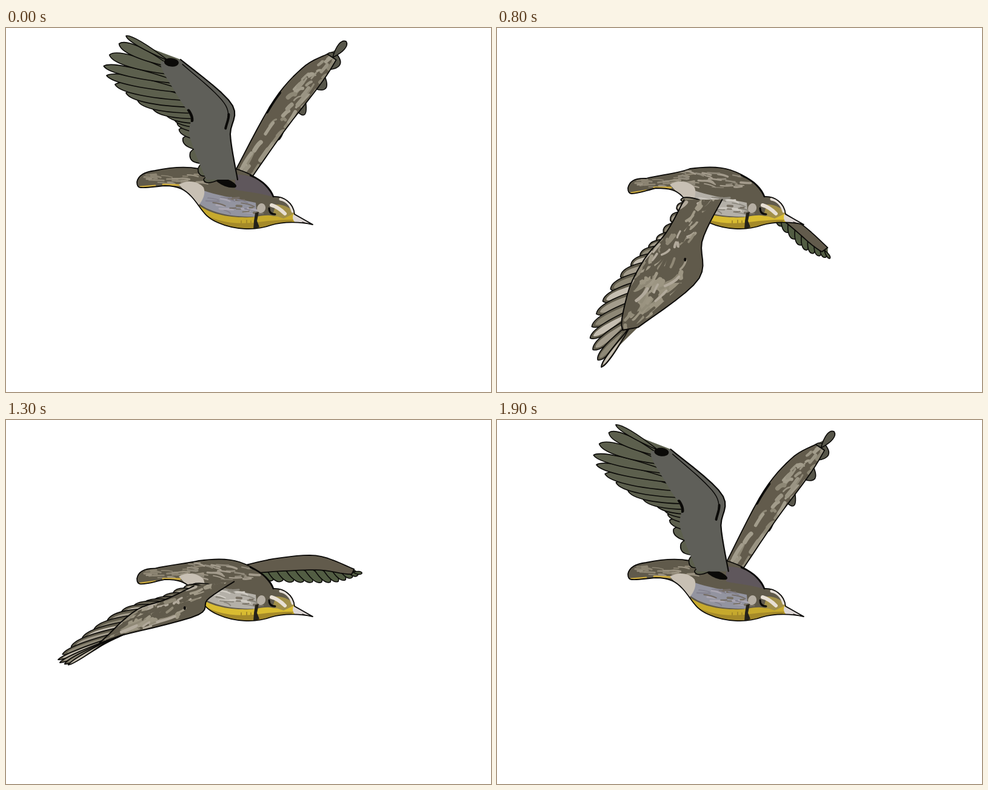
Animation, 800 px wide and 600 px high, one loop 2000 ms. Source, as an HTML page with a canvas:

```html
<!DOCTYPE html>
<html lang="en">
<head>
<meta charset="utf-8">
<title>Bird in flight</title>
<style>
  html, body { margin: 0; width: 100%; height: 100%; overflow: hidden; background: #fff; }
  canvas { display: block; width: 800px; height: 600px; }
</style>
</head>
<body>
<canvas id="stage" width="800" height="600"></canvas>
<script>
const ctx = document.getElementById('stage').getContext('2d');
const INK = '#0b0a08', BROWN = '#605a4b', STEP = 100, STEPS = 20;
const NEAR_ROOT = [350, 245], FAR_ROOT = [395, 238];

const lerp = (a, b, u) => a + (b - a) * u;
const between = (p, q, u) => [lerp(p[0], q[0], u), lerp(p[1], q[1], u)];
const distance = (p, q) => Math.hypot(p[0] - q[0], p[1] - q[1]);
const series = (n, f) => Array.from({ length: n }, (_, i) => f(i / (n - 1)));

function randomizer(seed) {
  return () => {
    seed = (seed * 16807) % 2147483647;
    return seed / 2147483647;
  };
}

// A wing is two curves from shoulder to hand: its leading edge and its feather tips.
const wing = (lead, tips) => ({ lead, tips });
const pose = (at, droop, near, far) => ({ at, droop, near, far });

const raised = pose(0, 0,
  wing([[382, 250], [370, 178], [372, 125], [288, 52]],
       [[326, 250], [290, 178], [272, 145], [205, 112], [161, 66], [198, 13]]),
  wing([[380, 232], [440, 122], [490, 65], [530, 43]],
       [[404, 246], [460, 165], [526, 80], [561, 22]]));
const spread = pose(3, 4,
  wing([[383, 250], [355, 203], [340, 168], [235, 145]],
       [[328, 255], [280, 220], [240, 194], [175, 190], [122, 176], [150, 139]]),
  wing([[385, 233], [440, 175], [500, 125], [566, 106]],
       [[408, 245], [490, 188], [562, 130], [597, 98]]));
const lowered = pose(6, 9,
  wing([[372, 272], [330, 335], [315, 390], [205, 447]],
       [[302, 280], [262, 330], [215, 365], [160, 425], [129, 485], [137, 517]]),
  wing([[405, 241], [450, 255], [520, 273], [576, 312]],
       [[440, 268], [490, 300], [540, 328], [580, 325]]));
const deepest = pose(10, 11,
  wing([[370, 292], [348, 360], [348, 435], [265, 530]],
       [[306, 285], [285, 345], [250, 392], [205, 452], [186, 520], [214, 589]]),
  wing([[440, 270], [460, 328], [490, 378], [510, 408]],
       [[425, 305], [450, 350], [478, 400], [513, 430]]));

// Shifts a wing in proportion to the distance from its root.
function reach({ lead, tips }, root, dx, dy) {
  const move = p => {
    const d = distance(p, root) / 270;
    return [p[0] + dx * d, p[1] + dy * d];
  };
  return wing(lead.map(move), tips.map(move));
}
const variant = (p, at, near, far) => pose(at, p.droop,
  reach(p.near, NEAR_ROOT, ...near), reach(p.far, FAR_ROOT, ...far));

const POSES = [raised, spread, lowered, deepest,
  variant(lowered, 12, [-11, 0], [-17, 4]),
  variant(spread, 15, [-22, -8], [-18, 0]),
  variant(raised, 19, [-2, -5], [-5, -3]),
  { ...raised, at: STEPS }];

function blendWing(a, b, u, root, swell) {
  const grow = 1 + swell * Math.sin(Math.PI * u);
  const mix = part => a[part].map((p, i) => between(root, between(p, b[part][i], u), grow));
  return wing(mix('lead'), mix('tips'));
}

function poseAt(step) {
  const k = POSES.findIndex(p => step < p.at) - 1;
  const a = POSES[k], b = POSES[k + 1], u = (step - a.at) / (b.at - a.at);
  const swell = Math.abs(b.droop - a.droop) > 4 ? 0.12 : 0.02;
  return {
    droop: lerp(a.droop, b.droop, u),
    near: blendWing(a.near, b.near, u, NEAR_ROOT, swell),
    far: blendWing(a.far, b.far, u, FAR_ROOT, swell * 0.85)
  };
}

// Catmull-Rom point on a list of key points.
function curve(points, u) {
  const last = points.length - 1, s = Math.min(1, Math.max(0, u)) * last;
  const k = Math.min(last - 1, Math.floor(s)), f = s - k;
  const [p, q, r, t] = [-1, 0, 1, 2].map(o => points[Math.min(last, Math.max(0, k + o))]);
  return q.map((b, i) => {
    const a = p[i], c = r[i], d = t[i];
    return b + 0.5 * f * (c - a + f * (2 * a - 5 * b + 4 * c - d + f * (3 * (b - c) + d - a)));
  });
}

// Maps along/across onto the panel; cover(u) is how far it overlaps the feathers.
const surface = (w, cover) => (u, v) =>
  between(curve(w.lead, u), curve(w.tips, u * 0.8), v * cover(u));

function polygon(points) {
  const path = new Path2D();
  points.forEach(p => path.lineTo(...p));
  return path;
}
const line = (place, v, from, to) => series(21, t => place(lerp(from, to, t), v));
const patch = (place, u0, u1, v0, v1) =>
  polygon([...line(place, v0, u0, u1), ...line(place, v1, u1, u0)]);

function fill(path, color) {
  ctx.fillStyle = color;
  ctx.fill(typeof path === 'string' ? new Path2D(path) : path);
}
function stroke(path, color, width) {
  ctx.strokeStyle = color;
  ctx.lineWidth = width;
  ctx.stroke(typeof path === 'string' ? new Path2D(path) : path);
}
function oval(x, y, rx, ry, turn, color) {
  const path = new Path2D();
  path.ellipse(x, y, rx, ry, turn, 0, 7);
  fill(path, color);
}
function clipped(path, draw) {
  ctx.save();
  ctx.clip(path);
  draw();
  ctx.restore();
}

// Short curved brush marks; place() maps the unit square to the stage.
function streaks(count, seed, place, colors, width, length) {
  const random = randomizer(seed);
  for (let i = 0; i < count; i++) {
    const u = random(), v = random(), du = length * (0.5 + random());
    const dv = (random() - 0.3) * 0.25;
    const path = new Path2D();
    path.moveTo(...place(u, v));
    path.quadraticCurveTo(...place(u + du * 0.6, v + dv * 0.1), ...place(u + du, v + dv));
    stroke(path, colors[i % colors.length], width * (0.5 + random()));
  }
}

function leaf(base, tip, width) {
  const length = distance(base, tip) || 1;
  const nx = (base[1] - tip[1]) / length * width, ny = (tip[0] - base[0]) / length * width;
  const side = (f, s) => {
    const p = between(base, tip, f);
    return [p[0] + nx * s, p[1] + ny * s];
  };
  const path = new Path2D();
  path.moveTo(...base);
  path.bezierCurveTo(...side(0.55, 1), ...side(0.93, 1), ...tip);
  path.bezierCurveTo(...side(0.93, -1), ...side(0.55, -1), ...base);
  return path;
}

function drawFeathers(w, place, count, color, highlights) {
  const gap = 1 / (count - 1);
  const web = series(25, t => between(place(t, 0.6), curve(w.tips, t), 0.65));
  fill(polygon([...line(place, 0, 0, 1), ...web.reverse()]), color);
  for (let i = 0; i < count; i++) {
    const t = i * gap, tip = curve(w.tips, t), base = place(t, 0.6);
    const width = 1.5 + 0.25 * distance(curve(w.tips, t - gap), curve(w.tips, t + gap));
    const shape = leaf(base, tip, width);
    fill(shape, color);
    if (highlights) {
      fill(leaf(between(base, tip, 0.25), between(base, tip, 0.94), width * 0.6),
        highlights[i % highlights.length]);
    }
    stroke(shape, INK, 1.6);
  }
}

function drawFarWing(w, droop) {
  const up = droop < 7;
  const place = surface(w, () => up ? 1.05 : 0.55);
  drawFeathers(w, place, up ? 7 : 13, up ? '#57564a' : '#525d43');
  const panel = patch(place, 0, 1, 0, 1);
  fill(panel, droop > 10 ? '#595a59' : '#625b4c');
  if (up) {
    clipped(panel, () => {
      streaks(55, 71, (u, v) => place(u, 0.2 + v * 0.8), ['#9a9483', '#8d8775', '#a29c8b'], 5, 0.06);
      stroke(polygon(line(place, 0, 0.28, 0.4)), INK, 6);
    });
  }
  stroke(panel, INK, 1.8);
}

function drawNearTop(w) {
  const place = surface(w, u => 0.92 - 0.6 * u ** 4);
  drawFeathers(w, place, 17, '#625d4d', ['#8e8876', '#c5beb1', '#a39c8c']);
  const panel = patch(place, 0, 1, 0, 1);
  fill(panel, BROWN);
  clipped(panel, () => {
    fill(patch(place, 0.68, 0.9, 0.22, 0.75), '#9a9380');
    streaks(36, 9, (u, v) => place(0.6 + u * 0.36, 0.18 + v * 0.75), ['#9c9582', BROWN, '#918b78'], 6, 0.09);
    streaks(50, 23, (u, v) => place(u * 0.75, 0.2 + v * 0.8), ['#a09987', '#b2aa9c', '#8f8876'], 4, 0.07);
    streaks(20, 57, place, [BROWN], 4, 0.08);
    oval(...place(0.5, 0.3), 2, 3, 0, INK);
  });
  stroke(polygon([...line(place, 0, 0, 1), ...line(place, 1, 1, 0)]), INK, 2);
}

function drawNearUnder(w, droop) {
  const flat = droop > 2;
  const place = surface(w, u => 0.92 - 0.66 * u ** 1.5);
  drawFeathers(w, place, 17, flat ? '#565d49' : '#5c5f4d');
  const panel = patch(place, 0, 1, 0, 1);
  fill(panel, flat ? '#5b6050' : '#5f5f59');
  clipped(panel, () => {
    if (flat) {
      fill(patch(place, 0.55, 1, 0, 0.4), '#625549');
      stroke(polygon(line(place, 0.4, 0.55, 1)), INK, 3);
      fill(patch(place, 0, 0.25, 0, 0.75), '#090505');
    } else {
      stroke(polygon(line(place, 0.14, 0.45, 0.95)), INK, 1.5);
      stroke(polygon(line(place, 0.13, 0.4, 0.56)), INK, 4);
      stroke(polygon(line(place, 0.98, 0.46, 0.58)), INK, 6);
    }
  });
  oval(...place(0.98, 0.5), flat ? 7 : 12, flat ? 3 : 7, 0.1, INK);
  stroke(polygon(line(place, 0, 0, 1)), INK, 2.2);
}

function drawHead() {
  oval(421, 297, 7, 8, 0.3, '#b5aea3');
  fill('M445 291 C456 290 470 296 477 305 L458 314 L440 308Z', '#a18f49');
  stroke('M453 282 C464 284 470 292 473 302', '#e5dfd8', 5);
  stroke('M438 292 Q449 295 460 306', '#e7dfd4', 6);
  stroke('M434 297 Q434 307 444 307', INK, 3);
  fill('M411 305 L417 303 L414 318 L418 328 L408 332 L409 318Z', '#25221a');
  fill('M474 307 L508 325 L478 321 C473 318 472 312 474 307Z', '#ddd7d5');
  fill('M488 319 L508 325 L490 322Z', '#342d2b');
}

function drawBody(d, under) {
  const flat = d > 2;
  const outline = new Path2D(`M216 ${254 + d} C218 ${243 + d} 228 ${237 + d} 246 ${235 + d * 1.3}
    C270 ${230 + d * 1.2} 298 ${228 + d * 1.2} 318 232 C345 228 370 229 385 234
    C415 244 432 260 441 278 C458 277 474 288 476 307 L506 324
    C488 320 460 318 437 325 C410 335 375 332 350 321 C325 311 322 295 306 278
    C296 267 285 ${260 + d * 0.4} 262 ${260 + d * 0.4}
    C245 ${261 + d * 0.7} 235 ${264 + d * 0.9} 222 ${263 + d}
    C218 ${263 + d} 216 ${260 + d} 216 ${254 + d}Z`);
  fill(outline, BROWN);
  clipped(outline, () => {
    if (!flat) fill('M378 242 C410 240 432 258 441 279 C420 271 390 270 378 266Z', '#5f575c');
    streaks(24, 41, (u, v) => [228 + u * 88, 239 + v * 17 + d * (1 - u)], ['#8d8573', '#9a9281'], 2.5, 0.16);
    if (!under) streaks(30, 88, (u, v) => [300 + u * 105, 233 + v * 25 + u * 10], ['#8f8879', '#a39b8c'], 2.5, 0.13);
    stroke(`M221 ${262 + d} L246 ${260 + d * 0.8} M259 ${258 + d * 0.5} L287 ${259 + d * 0.4}`, '#cfad3e', 3);

    fill('M326 268 C345 275 375 280 412 288 L414 311 C375 312 335 306 312 284Z',
      under ? (flat ? '#99949f' : '#9394a0') : '#b4b0a8');
    fill('M285 258 C300 249 318 253 326 263 C330 274 324 284 318 292 L300 274Z', '#c8c0b4');
    streaks(20, 33, (u, v) => [330 + u * 75, 276 + v * 26 + u * 6],
      under ? ['#84828f', '#aaa6b2', '#756d66'] : ['#d0ccc4', '#8b877d'], 2.2, 0.2);
    fill('M312 288 C330 303 358 312 390 312 C412 314 425 306 442 310 C455 311 468 306 477 304 V340 H350Z',
      under ? '#c6a92d' : '#d9bc31');
    fill('M318 300 C340 318 370 324 408 321 C430 318 450 316 476 316 L440 340 L350 335Z', '#a58a29');
    if (under && flat) fill('M342 312 C365 318 388 315 412 318 L408 334 L365 334Z', '#a58928');
    else stroke('M388 318 V327 M397 317 V328 M404 318 V327', '#a58a29', 2);
    streaks(7, 64, (u, v) => [380 + u * 40, 293 + v * 13], ['#777064'], 3, 0.2);
    drawHead();
  });
  stroke(outline, INK, 1.8);
  stroke('M403 243 C425 252 437 266 441 278', INK, 2.5);
  if (under) {
    if (flat) oval(358, 261, 11, 6, 0.1, INK);
    else oval(363, 255, 18, 6, 0.35, INK);
  }
}

function draw(now) {
  const step = Math.floor(now / STEP) % STEPS;
  const { near, far, droop } = poseAt(step);
  const under = step < 5 || step > 13;
  ctx.lineCap = ctx.lineJoin = 'round';
  ctx.clearRect(0, 0, 800, 600);
  drawFarWing(far, droop);
  drawBody(droop, under);
  if (under) drawNearUnder(near, droop);
  else drawNearTop(near);
}

let start;
function tick(now) {
  start ??= now;
  draw(now - start);
  requestAnimationFrame(tick);
}
draw(0);
requestAnimationFrame(tick);
</script>
</body>
</html>
```
